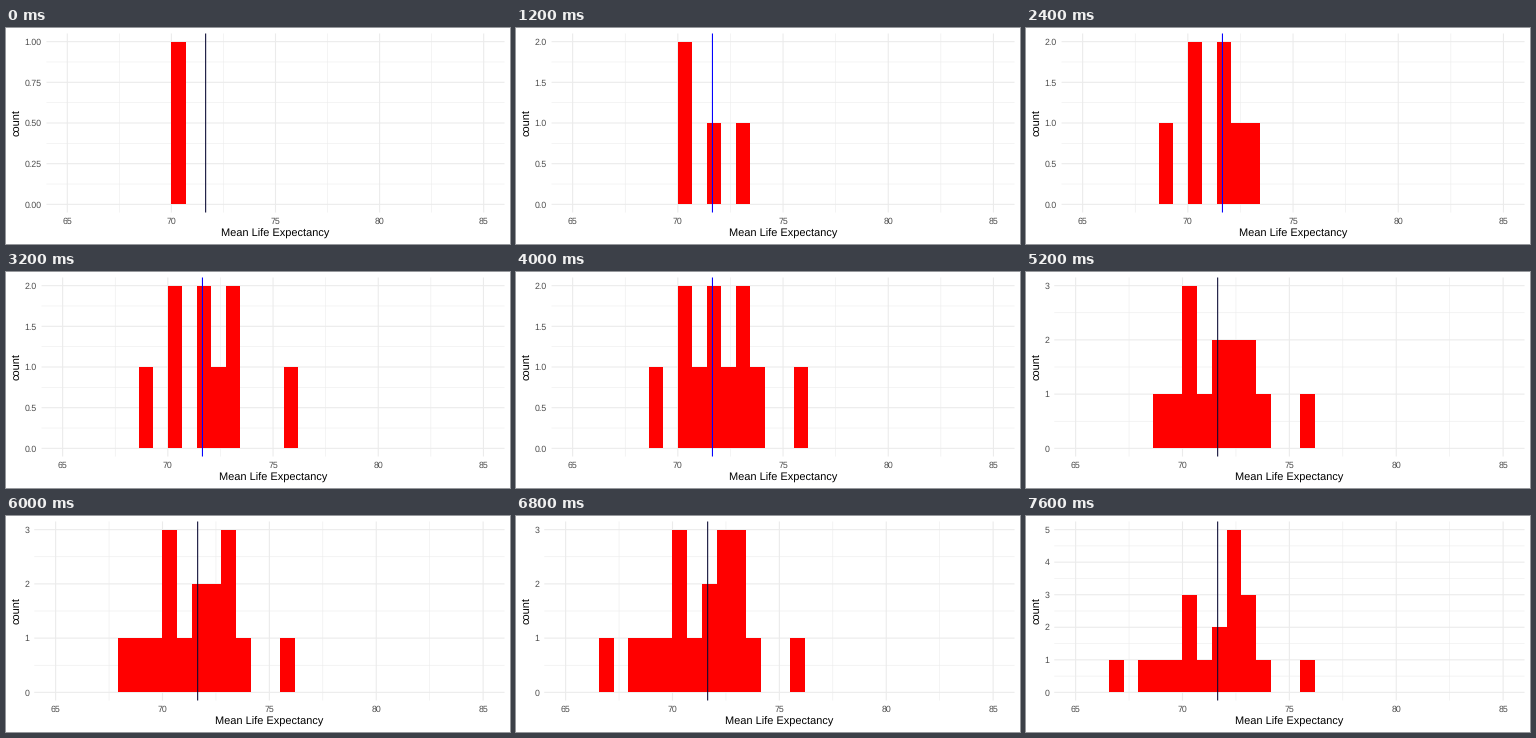
A matplotlib script for the animation above (8000 ms loop, 504 px wide and 216 px high).

```python
import matplotlib.pyplot as plt
from matplotlib.animation import FuncAnimation
from matplotlib.patches import Rectangle

plt.rcParams["font.family"] = "Liberation Sans"
plt.rcParams["text.hinting"] = "none"

WIDTH, HEIGHT = 504, 216
TOP, BOTTOM, RIGHT = 5.5, 184.5, 498.5
X_MIN, X_MAX = 64, 86
BIN_WIDTH = 20 / 29
LABEL_SIZE, TITLE_SIZE = 8.8, 11
GRID, LABEL_GREY = "#ebebeb", "#4d4d4d"
MEAN = 71.645

# One sample mean is added per frame; each entry is the bin it falls in.
SAMPLES = [101, 101, 105, 103, 99, 103, 104, 105, 109, 102,
           106, 104, 100, 101, 98, 105, 104, 96, 104, 104]

fig = plt.figure(figsize=(WIDTH / 72, HEIGHT / 72), dpi=72, facecolor="white")
ax = fig.add_axes([0, 0, 1, 1])


def panel_left(decimals):
    """Left panel edge, which depends on how wide the count labels are."""
    digit = LABEL_SIZE * 0.556
    return 28.25 + decimals * digit + (digit / 2 if decimals else 0)


def draw_line(xs, ys, color=GRID, width=1.07):
    ax.plot(xs, ys, color=color, lw=width, solid_capstyle="butt", snap=False)


def draw(frame):
    ax.clear()
    ax.set(xlim=(0, WIDTH), ylim=(HEIGHT, 0))
    ax.axis("off")

    seen = SAMPLES[:frame + 1]
    counts = {b: seen.count(b) for b in set(seen)}
    peak = max(counts.values())
    step, decimals = {1: (0.25, 2), 2: (0.5, 1)}.get(peak, (1, 0))
    left = panel_left(decimals)
    pad = (BOTTOM - TOP) / 22

    def px(value):
        return left + (value - X_MIN) / (X_MAX - X_MIN) * (RIGHT - left)

    def py(count):
        return BOTTOM - pad - count / peak * (BOTTOM - TOP - 2 * pad)

    x_ticks = range(65, 86, 5)
    y_ticks = [i * step for i in range(round(peak / step) + 1)]

    # Minor grid below the major grid
    for ticks, gap, width in ((x_ticks[:-1], 2.5, 0.53), (x_ticks, 0, 1.07)):
        y_part = y_ticks[:-1] if gap else y_ticks
        for tick in y_part:
            y = py(tick + (step / 2 if gap else 0))
            draw_line([left, RIGHT], [y, y], width=width)
        for tick in ticks:
            x = px(tick + gap)
            draw_line([x, x], [TOP, BOTTOM], width=width)

    base = round(py(0))
    for b, count in counts.items():
        x0, x1 = (round(px((b + k) * BIN_WIDTH)) for k in (0.5, 1.5))
        top = round(py(count))
        ax.add_patch(Rectangle((x0, top), x1 - x0, base - top,
                               color="red", lw=0, zorder=3))

    x = px(MEAN)
    line_color = "#0000ff" if peak == 2 else "#0a0a33"
    ax.plot([x, x], [TOP, BOTTOM], color=line_color, lw=1.07,
            solid_capstyle="butt", snap=False, zorder=4)

    style = dict(fontsize=LABEL_SIZE, color=LABEL_GREY, va="baseline")
    for tick in x_ticks:
        ax.text(px(tick), 195.75, str(tick), ha="center", **style)
    for tick in y_ticks:
        ax.text(left - 4.95, py(tick) + 3.15, f"{tick:.{decimals}f}",
                ha="right", **style)

    ax.text((left + RIGHT) / 2, 209, "Mean Life Expectancy", ha="center",
            va="baseline", fontsize=TITLE_SIZE, color="black")
    ax.text(13.4, (TOP + BOTTOM) / 2, "count", rotation=90,
            rotation_mode="anchor", ha="center", va="baseline",
            fontsize=TITLE_SIZE, color="black")
    return []


anim = FuncAnimation(fig, draw, frames=len(SAMPLES), init_func=lambda: [],
                     interval=400, repeat=True, repeat_delay=0)
plt.show()
```
